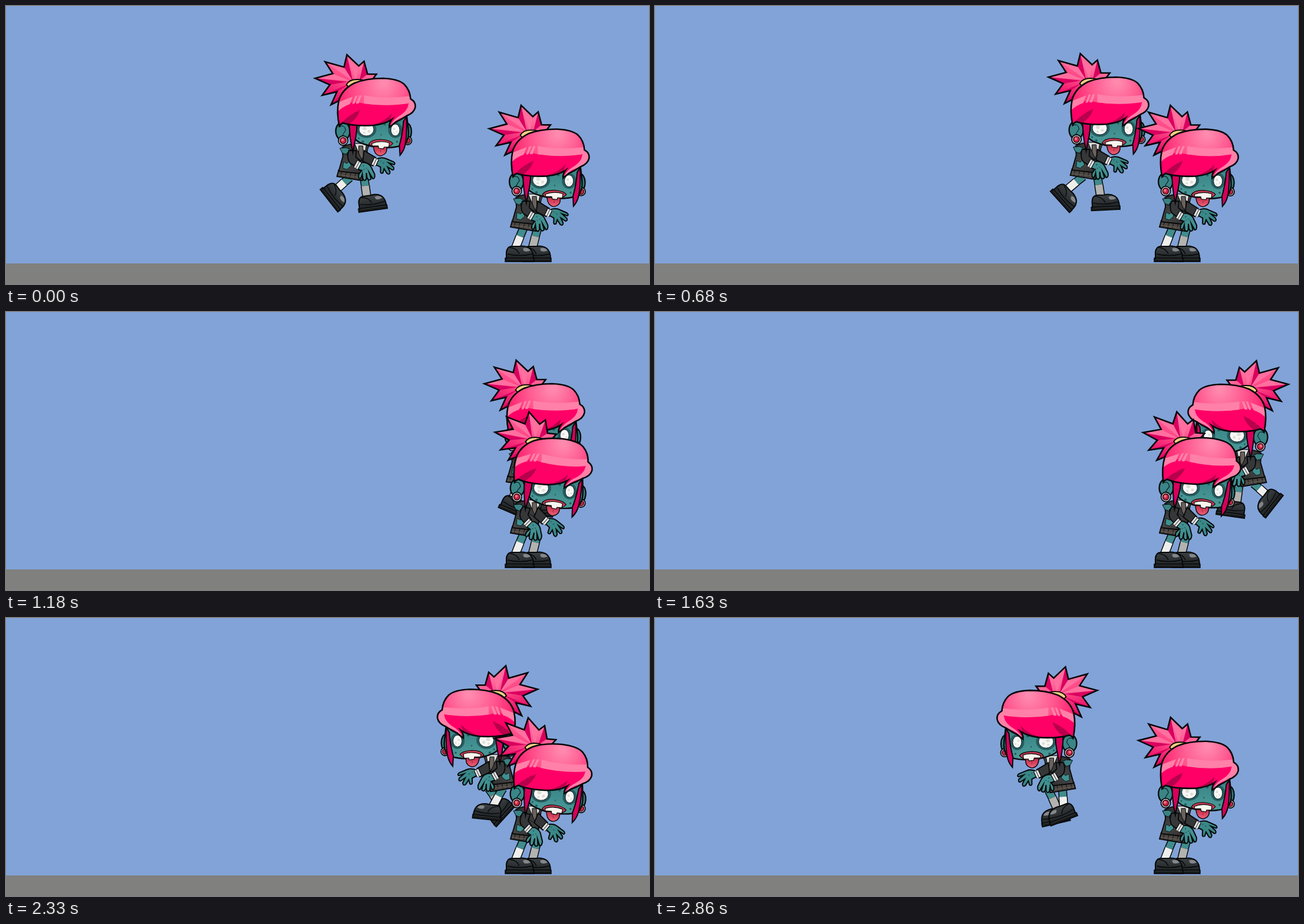
Animation of 1091x473 px, one loop 2890 ms. Source, as an HTML page with a canvas:

```html
<!DOCTYPE html>
<html lang="en">
<head>
<meta charset="utf-8">
<title>Zombie patrol</title>
<style>
html, body { margin: 0; width: 100%; height: 100%; overflow: hidden; background: #82a3d8; }
canvas { display: block; }
</style>
</head>
<body>
<canvas id="stage" width="1091" height="473"></canvas>
<script>
const ctx = document.getElementById('stage').getContext('2d');
const LOOP = 2890, STRIDE = 240, IDLE = 690, TAU = Math.PI * 2;
const INK = '#050708', SKIN_DARK = '#235c60';
const LIGHT = '#ff80a8', HOT = '#ff0066', DEEP = '#b8004c';

// Ankle keys: phase, x, y, angle in degrees
const NEAR = [[0, 37, 232, 52], [.11, 28.6, 234, 46], [.17, 56, 241, 15], [.5, 78, 242, -7],
  [.6, 75, 241, 0], [.72, 58, 242, 21], [.94, 36, 243, 22]];
const FAR = [[0, 89, 247, -8], [.11, 90, 245, 0], [.25, 79, 245, 12], [.5, 66, 237, 48],
  [.62, 64, 238, 44], [.72, 68, 247, 13], [.94, 75, 240, 33]];
const STAND_NEAR = [46, 247, 0], STAND_FAR = [75, 247, 0];

function grad(x0, y0, x1, y1, ...colors) {
  const g = ctx.createLinearGradient(x0, y0, x1, y1);
  colors.forEach((c, i) => g.addColorStop(i / (colors.length - 1), c));
  return g;
}
const skin = grad(0, 105, 0, 220, '#357f82', '#4d9d9a', '#2f7c7e');
const spikes = grad(70, 5, 30, 90, '#ff84aa', '#ff4384', '#e00060');
const cloth = grad(40, 158, 85, 210, '#2a2b2d', '#454545', '#272728');
const leather = grad(0, -6, 0, 20, '#3e4346', '#1d2022');
const tongue = grad(0, 160, 0, 175, '#c52f4b', '#f0627a');
const crown = ctx.createRadialGradient(118, 50, 4, 112, 62, 66);
crown.addColorStop(0, '#ff8aae');
crown.addColorStop(.5, '#ff5f94');
crown.addColorStop(1, '#ff2b75');

const cache = {};
function shape(d, fill, width = 0) {
  const p = cache[d] || (cache[d] = new Path2D(d));
  if (fill) { ctx.fillStyle = fill; ctx.fill(p); }
  if (width) { ctx.strokeStyle = INK; ctx.lineWidth = width; ctx.stroke(p); }
}
function oval(x, y, rx, ry, fill, width = 0) {
  ctx.beginPath();
  ctx.ellipse(x, y, rx, ry, 0, 0, TAU);
  ctx.fillStyle = fill;
  ctx.fill();
  if (width) { ctx.strokeStyle = INK; ctx.lineWidth = width; ctx.stroke(); }
}
function bar(x0, y0, x1, y1, color, width) {
  ctx.beginPath();
  ctx.moveTo(x0, y0);
  ctx.lineTo(x1, y1);
  ctx.strokeStyle = color;
  ctx.lineWidth = width;
  ctx.stroke();
}
function dots(color, list) {
  for (const [x, y, r] of list) oval(x, y, r, r, color);
}
function turned(x, y, angle, draw) {
  ctx.save();
  ctx.translate(x, y);
  ctx.rotate(angle);
  ctx.translate(-x, -y);
  draw();
  ctx.restore();
}

function shoe([x, y, deg]) {
  ctx.save();
  ctx.translate(x, y);
  ctx.rotate(deg * Math.PI / 180);
  shape('M-15 17L-15 6Q-14 -3 -7 -4L6 -4Q16 -6 24 -1Q31 4 31 17Z', leather, 2);
  shape('M13 0Q20 -4 26 3Q20 6 15 4Z', '#83878a');
  shape('M-9 -2Q3 -1 7 9M-13 9Q8 14 29 9', null, 1.3);
  shape('M-17 16L32 16L32 22L-17 22Z', '#17191a', 1.4);
  bar(-14, 17.5, 30, 17.5, '#3a3e40', 1);
  ctx.restore();
}
function leg(hx, hy, foot, sock) {
  const kx = hx + (foot[0] - hx) * .42, ky = hy + (foot[1] - hy) * .4;
  const thigh = [hx, hy, kx, ky], shin = [kx, ky, foot[0], foot[1]];
  bar(...thigh, INK, 15);
  bar(...thigh, '#418c8d', 12);
  oval(kx, ky, 6, 6, '#418c8d');
  bar(...shin, INK, 15.5);
  bar(...shin, sock, 12.5);
  shoe(foot);
}

function torso() {
  shape('M41 199L83 203L81 217L74 216L38 210Z', '#4b4642', 1.8);
  for (let x = 46; x < 80; x += 8) bar(x, 202, x - 2, 212, '#25211f', 1.4);
  bar(40, 207, 81, 212, '#6a615b', 1);
  shape('M47 160Q66 150 90 158L88 182L83 206L41 201L48 176Z', cloth, 1.8);
  shape('M66 154L90 154L83 184Z', '#dcdcdc', 1);
  shape('M75 158L82 158L83 176L79 181L75 175Z', '#6b625d', 1);
  shape('M62 155L68 154L81 184L70 178ZM88 156L92 159L83 184Z', '#3a3a3b', 1);
  shape('M49 185L55 188L60 183L62 192L55 198L48 196Z', '#3f9090', .8);
  shape('M43 162L54 161L62 165L54 171L57 174L47 170Z', '#3b8284', 1);
}
function cuff(x0, y0, x1, y1) {
  bar(x0, y0, x1, y1, INK, 9.5);
  bar(x0, y0, x1, y1, '#e4e4e4', 7);
  bar(x0, y0, x1, y1, '#4d4d4d', 1.2);
}
function farArm() {
  shape('M84 166L104 178L99 192L82 184Z', '#353637', 1.8);
  shape('M104 181Q114 176 122 180L134 185Q138 188 135 190L126 187L134 194Q136 199 132 199L124 194L128 202Q128 208 123 205L118 197L116 204Q111 206 112 200L112 194L104 190Z', '#3a8788', 2);
  dots(SKIN_DARK, [[112, 184, 1], [117, 187, 1.2]]);
  cuff(100, 191, 105, 180);
}
function nearArm() {
  shape('M58 166Q54 180 60 187L71 194L78 184L70 177L71 166Z', '#363738', 1.8);
  shape('M74 187L84 186Q94 188 97 196L102 206Q103 214 99 214L93 204L96 214Q92 219 89 212L88 204L88 214Q85 220 82 214L81 206Q78 218 75 212Q73 207 80 200L74 198Z', '#428f90', 2);
  dots(SKIN_DARK, [[83, 192, 1.2], [88, 196, 1], [84, 198, 1]]);
  cuff(70, 196, 76, 185);
}

function earring(x, y, r) {
  oval(x, y, r, r, '#eadfe2', 1.8);
  oval(x, y, r * .66, r * .66, '#c81f42', 1.2);
  oval(x - 1, y - 1, r * .3, r * .3, '#ee6d83');
}
function eye(x, y, rx, ry) {
  oval(x, y, rx + 4.5, ry + 3.5, SKIN_DARK);
  oval(x, y, rx, ry, '#f8f8f6', .8);
  dots('#deded9', [[x - rx * .25, y - ry * .2, rx * .28], [x + rx * .35, y + ry * .3, rx * .2], [x - rx * .3, y + ry * .5, rx * .15]]);
}
function ponytail() {
  const d = 'M1 43L31 35L18 15L50 24L55 3L75 22L84 14L90 36L105 36L96 48L60 60L40 82L28 88L38 66L13 72L26 54Z';
  shape(d, spikes);
  shape('M18 15L50 24L66 48ZM55 3L75 22L70 48ZM1 43L31 35L62 48Z', '#ff6f9f');
  shape('M1 43L56 49L26 54ZM13 72L58 53L38 66ZM28 88L56 60L40 82ZM50 24L55 3L65 48ZM84 14L90 36L76 47Z', '#d90060');
  shape(d, null, 2.6);
  shape('M54 54Q60 42 82 46L82 51Q68 48 58 58Z', '#f6cf83', 1.8);
}
function fringe() {
  const d = 'M42 124Q37 100 41 82Q46 62 68 51Q88 43 116 43Q142 44 152 53Q162 63 163 78Q172 83 171 92Q169 102 156 107Q146 114 137 118L127 126Q126 120 131 113Q119 121 100 123Q68 125 48 119Q44 121 42 124Z';
  shape(d, crown);
  ctx.save();
  ctx.clip(cache[d]);
  shape('M36 92Q60 80 84 86Q125 92 163 82L160 92Q158 106 128 128L36 128Z', HOT);
  shape('M84 72Q122 79 164 73L163 85Q125 92 84 86ZM69 73L73 72L68 86L64 87ZM76 72L80 72L75 86L70 86ZM40 84L65 74L60 87Q48 91 40 99Z', LIGHT);
  shape('M163 77Q174 82 172 93Q169 103 150 109Q136 114 128 126Q130 117 141 109Q158 99 159 88Z', LIGHT);
  shape('M43 121Q60 104 77 97Q73 112 57 122ZM100 122Q118 117 131 103Q129 115 122 120Z', DEEP);
  ctx.restore();
  shape(d, null, 2.6);
}
function head() {
  ponytail();
  oval(156, 134, 8.5, 15, '#33797c', 2.2);
  earring(158, 149, 7);
  oval(48, 133, 12, 15.5, '#3a8587', 2.3);
  shape('M42 126Q50 120 53 131Q48 138 46 144', null, 1);
  earring(48.5, 149, 8);
  shape('M64 112L65 138Q67 150 84 155Q104 162 124 161Q146 160 154 154Q161 146 159 128L156 103L100 110Z', skin, 2.4);
  dots(SKIN_DARK, [[119, 121, 2.2], [82, 151, 2.2], [75, 145, 1.5], [140, 151, 1.8], [146, 147, 1.2], [113, 139, 1.2]]);
  eye(88, 130, 12.5, 11);
  eye(137, 131, 7.5, 10);
  shape('M92 155Q96 147 112 147Q129 148 133 154Q127 162 112 162Q99 162 92 155Z', '#c63b53', 1.2);
  shape('M100 159L122 159Q125 172 112 175Q101 174 100 159Z', tongue, 1.4);
  bar(112, 164, 112, 169, '#a9223c', 1);
  shape('M97 154Q112 148 127 153L126 160L118 160L117 163L109 162L108 158L98 158Z', '#f7f5ee', 1.2);
  shape('M59 120Q59 142 65 169Q67 156 70 143Q72 132 72 120Z', '#d6005b', 2);
  shape('M151 116Q149 140 144 157L145 174Q152 166 154 155Q157 140 156 108Z', '#d6005b', 2);
  fringe();
}

// bend: 0 upright, 1 drooped
function zombie(near, far, bend, bob) {
  ctx.lineJoin = 'miter';
  ctx.lineCap = 'butt';
  leg(84, 212 + bob, far, '#b2b2b0');
  leg(60, 212 + bob, near, '#eeeeec');
  ctx.save();
  ctx.translate(0, bob);
  torso();
  turned(85, 169, bend * .34, farArm);
  turned(62, 169, bend * .32, nearArm);
  turned(52, 152, bend * .118, head);
  ctx.restore();
}

function pose(keys, phase) {
  let i = keys.length - 1;
  while (keys[i][0] > phase) i--;
  const a = keys[i], b = keys[(i + 1) % keys.length];
  const end = b[0] || 1, k = (phase - a[0]) / (end - a[0]);
  return [1, 2, 3].map(n => a[n] + (b[n] - a[n]) * k);
}

function walker(t) {
  const left = t >= 1535;
  const moved = Math.max(0, t - (left ? 1727 : 183));
  const phase = moved / STRIDE % 1;
  const bob = moved ? -.5 - 1.5 * Math.cos(2 * TAU * (phase - .06)) : 0;
  ctx.save();
  ctx.translate(left ? 1075.5 - moved * .286 : 523.5 + moved * .288, 80);
  if (left) ctx.scale(-1, 1);
  zombie(pose(NEAR, phase), pose(FAR, phase), 0, bob);
  ctx.restore();
}
function stander(t) {
  const sway = (1 - Math.cos(TAU * (t / IDLE - .06))) / 2;
  ctx.save();
  ctx.translate(818, 166);
  zombie(STAND_NEAR, STAND_FAR, Math.pow(sway, .85), 0);
  ctx.restore();
}

let start;
function frame(now) {
  if (start === undefined) start = now;
  const t = (now - start) % LOOP;
  ctx.fillStyle = '#82a3d8';
  ctx.fillRect(0, 0, 1091, 473);
  ctx.fillStyle = '#80807e';
  ctx.fillRect(0, 438, 1091, 35);
  walker(t);
  stander(t);
  requestAnimationFrame(frame);
}
requestAnimationFrame(frame);
</script>
</body>
</html>
```
